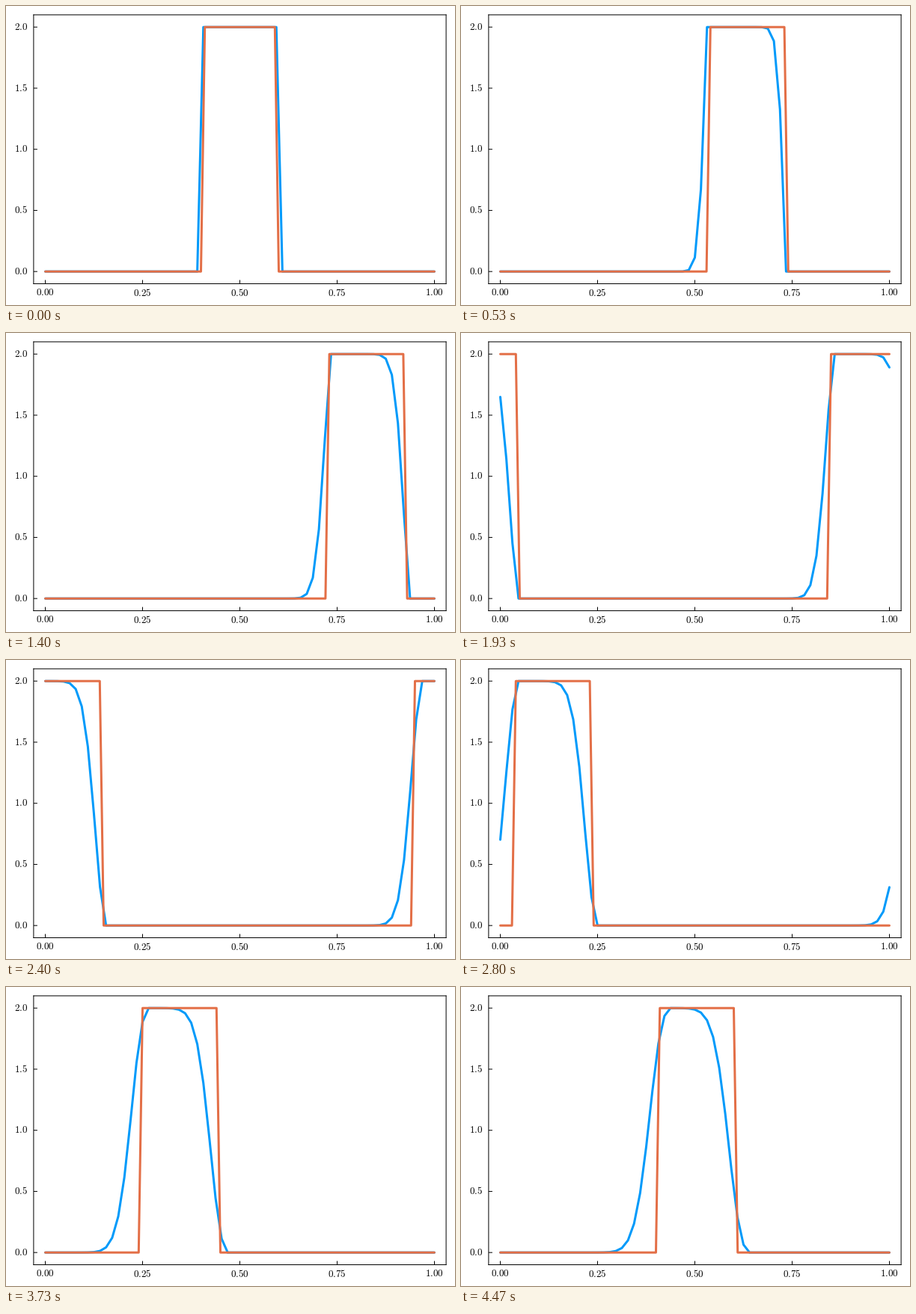
Recreate the animation shown at these times as a matplotlib script. Size 600 by 400 pixels, loop 4.54 s.

```python
import matplotlib.pyplot as plt
import numpy as np
from matplotlib.animation import FuncAnimation

# Linear advection of a square pulse: first-order upwind against the exact solution.
W, H, DPI = 600, 400, 100
PX = 72 / DPI  # points per pixel
STEPS, RATE = 68, 15  # solver steps in a loop, steps per second
LOOP, TICK = 4540, 20  # ms
CELLS, CFL = 64, 0.95
DT = CFL / CELLS
X0, Y0, X_UNIT, Y_UNIT = 52.5, 355.2, 520, 163.5  # data to pixels
XLIM, YLIM = (-0.03, 1.03), (-0.1, 2.1)

plt.rcParams["mathtext.fontset"] = "cm"
plt.rcParams["path.simplify"] = False


def to_px(x, y):
    return X0 + X_UNIT * x, Y0 - Y_UNIT * y


def pulse(x):
    return np.where((x > 0.4) & (x < 0.6), 2.0, 0.0)


def upwind(u):
    return u - CFL * (u - np.roll(u, 1))


x_num = np.arange(CELLS + 1) / CELLS
x_exact = np.arange(101) / 100

history = [pulse(x_num)]
for _ in range(STEPS - 1):
    history.append(upwind(history[-1]))

left, bottom = to_px(XLIM[0], YLIM[0])
right, top = to_px(XLIM[1], YLIM[1])
fig = plt.figure(figsize=(W / DPI, H / DPI), dpi=DPI, facecolor="white")
ax = fig.add_axes([left / W, 1 - bottom / H, (right - left) / W, (bottom - top) / H],
                  xlim=XLIM, ylim=YLIM, xticks=[], yticks=[])
for spine in ax.spines.values():
    spine.set(linewidth=PX, snap=False)


def label(x, y, text, ha):
    fig.text(x / W, 1 - y / H, f"${text}$", ha=ha, va="center", fontsize=13 * PX)


x_ticks = np.linspace(0, 1, 5)
y_ticks = np.linspace(0, 2, 5)
thin = dict(colors="black", linewidths=PX, snap=False)
ax.vlines(x_ticks, YLIM[0], YLIM[0] + 5 / Y_UNIT, **thin)
ax.hlines(y_ticks, XLIM[0], XLIM[0] + 5 / X_UNIT, **thin)
for v in x_ticks:
    label(to_px(v, 0)[0] - 0.5, 383.5, f"{v:.2f}", "center")
for v in y_ticks:
    label(29, to_px(0, v)[1], f"{v:.1f}", "right")


def curve(x, color):
    return ax.plot(x, pulse(x), color=color, lw=3 * PX, zorder=3,
                   solid_capstyle="round", solid_joinstyle="round")[0]


numeric = curve(x_num, "#009AFA")
exact = curve(x_exact, "#E36F47")
ax.set(xlim=XLIM, ylim=YLIM)


def draw(i):
    # Steps fall on 10 ms marks, so look up to 15 ms ahead within a tick.
    k = min(int((i * TICK + 15) * RATE / 1000), STEPS - 1)
    # The exact curve runs one step ahead once the pulse has started.
    t = (k + 1) * DT if k else 0
    numeric.set_ydata(history[k])
    exact.set_ydata(pulse((x_exact - t) % 1))
    return numeric, exact


anim = FuncAnimation(fig, draw, frames=LOOP // TICK, interval=TICK,
                     repeat=True, repeat_delay=0)
plt.show()
```
